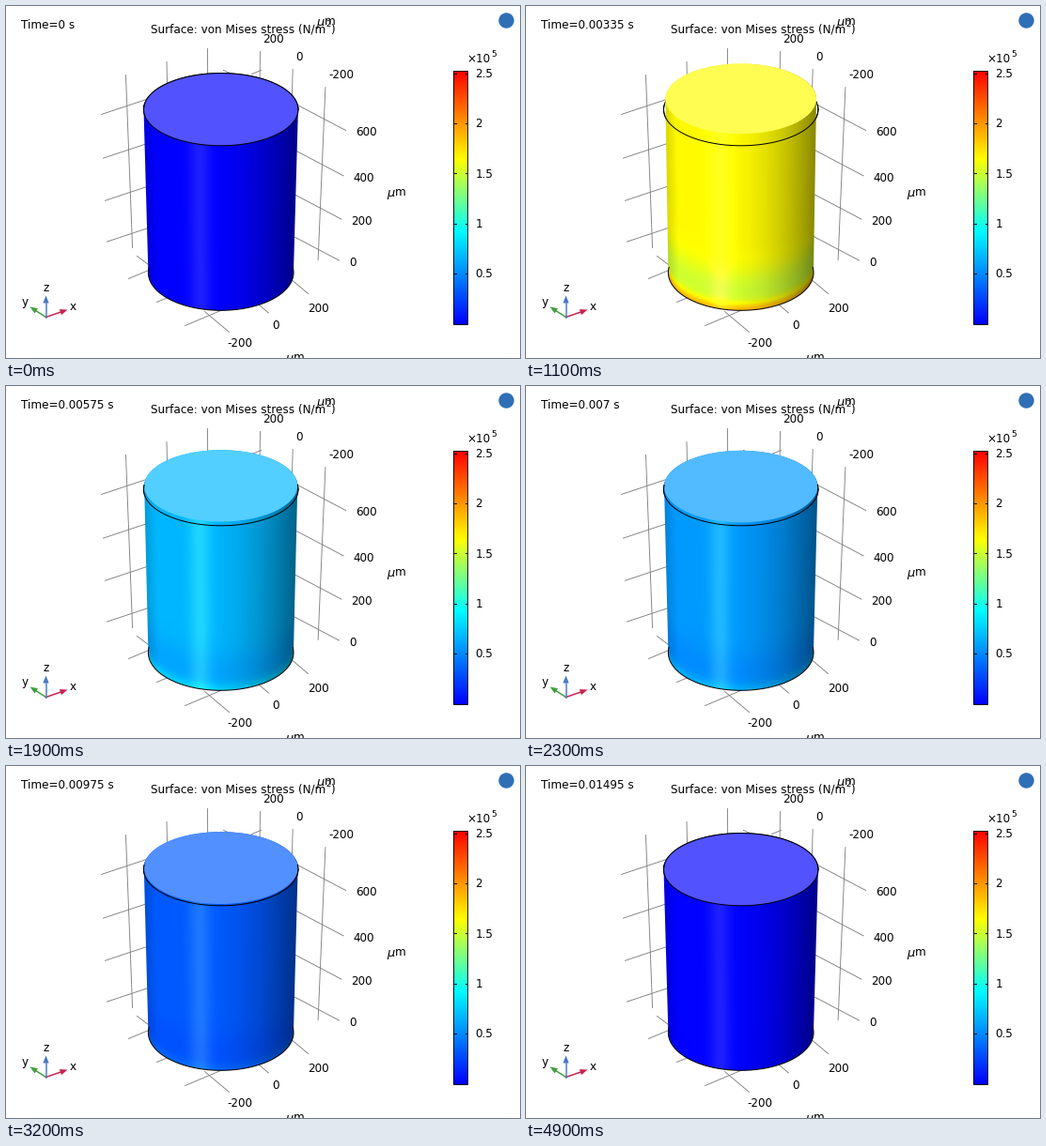
Animation of 547 by 375 pixels, one loop 5 s. Source, as a matplotlib script:

```python
import numpy as np
import matplotlib.pyplot as plt
from matplotlib.animation import FuncAnimation
from matplotlib.patches import Circle, Ellipse, Polygon, Rectangle
from matplotlib.path import Path

W, H, DPI = 547, 375, 64
PX = 72 / DPI                      # points per pixel
FRAMES, INTERVAL = 50, 100
MAX_STRESS = 2.53                  # in units of 1e5 N/m^2

CX, TOP_Y, BOTTOM_Y = 229.2, 110.7, 284.5
TOP_RX, TOP_RY = 82.2, 38.6
BOTTOM_RX, BOTTOM_RY = 77.3, 40.3
X0, X1, Y0, Y1 = 144, 315, 50, 330

plt.rcParams["font.family"] = "DejaVu Sans"
fig = plt.figure(figsize=(W / DPI, H / DPI), dpi=DPI, facecolor="white")
ax = fig.add_axes([0, 0, 1, 1])


def rainbow(frac):
    """Blue, cyan, yellow, red."""
    red = (frac - 0.37) / 0.28
    green = np.minimum(frac / 0.37, (1 - frac) / 0.35)
    blue = (0.65 - frac) / 0.28
    return np.clip(np.stack([red, green, blue], axis=-1), 0, 1)


def text(x, y, s, size=12, **kw):
    return ax.text(x, y, s, fontsize=size * PX, va="baseline", zorder=8, **kw)


def line(x, y, dx, dy, color="#808080", width=0.9, zorder=1):
    ax.plot([x, x + dx], [y, y + dy], color=color, lw=width * PX, zorder=zorder)


def micrometre(x, y):
    text(x, y, "μ", 13, style="italic")
    text(x + 8.5, y, "m")


def arc(cy, rx, ry, start, stop):
    a = np.radians(np.linspace(start, stop, 120))
    return CX + rx * np.cos(a), cy + ry * np.sin(a)


def arrow(dx, dy, color):
    origin, vector = np.array([43, 332]), np.array([dx, dy])
    d = vector / np.hypot(dx, dy)
    side = 3.2 * np.array([-d[1], d[0]])
    tip = origin + vector
    base = tip - 8 * d
    line(*origin, *(base - origin), color=color, width=1.5, zorder=5)
    ax.add_patch(Polygon([tip, base + side, base - side], fc=color, lw=0, zorder=6))


def draw_upright(x, y):
    line(x, y, 0.07 * (CX - x), 184)


def draw_grid():
    # Walls: uprights and heights, the spacing shrinking with depth.
    for k, name in enumerate(["200", "0", "-200"]):
        draw_upright(128 + 43.5 * k, 74 - 14 * k)
        x, y = 271 + 34.7 * k, 49 + 19 * k
        draw_upright(x, y)
        text(x + 3, y - 9.5, name)
    for k, name in enumerate(["600", "400", "200", "0"]):
        line(102 + 2 * k, 116 + 47.3 * k - 0.7 * k * k, 48, -16)
        x, y = 362 - 2.3 * k, 133 + 49.5 * k - 1.1 * k * k
        line(x, y, -55, -29)
        text(x + 10.5, y + 6, name)
    # Floor, seen between the cylinder and the labels.
    for k, name in enumerate(["200", "0", "-200"]):
        line(131 + 30 * k, 291 + 25 * k, 38, -16)
        line(322 - 42 * k, 307 + 20.5 * k, -26, -22)
        text(332.5 - 47.5 * k + 3 * k * k, 326 + 18.7 * k, name, ha="center")
    line(140, 267, 20, 15)
    # Far top corner.
    line(232, 69, 9, 4)
    line(262, 73, 10, -4)
    micrometre(331, 21)
    micrometre(406, 203)
    micrometre(298, 379)


def draw_colorbar():
    ramp = rainbow(np.linspace(1, 0, 270))[:, None]
    ax.imshow(ramp, extent=[476.5, 491.5, 339.5, 69.5], aspect="auto", zorder=2)
    ax.add_patch(Rectangle((476.5, 69.5), 15, 270, fill=False, lw=0.9 * PX, zorder=3))
    for value in np.arange(1, 6) / 2:
        y = 338.5 - value * 106.5
        for x in (477, 489):
            line(x, y, 2, 0, "black", zorder=4)
        text(500, y + 4.4, f"{value:g}")
    text(490.5, 61, "×10")
    text(517, 55, "5", 9)


def draw_triad():
    arrow(23, -8, "#cc2050")
    arrow(-17, -11, "#40a040")
    arrow(0, -23, "#4878c4")
    text(43, 305, "z", ha="center")
    text(21, 320, "y", ha="center")
    text(72, 325, "x", ha="center")


def bulk_stress(i):
    """Quick pull, then a slow release."""
    return np.interp(i, [0, 8, 11, 19, 32, 40, 50],
                     [0, 2.1, 1.66, 0.67, 0.33, 0.04, 0])


def time_label(i):
    t = int(i * 299 / 49 + 1e-6) * 5e-5
    if 0 < t < 9.99e-4:
        return f"Time={t * 1e4:.2g}E-4 s"
    return f"Time={t:.6g} s"


gx, gy = np.meshgrid(np.arange(X0, X1), np.arange(Y0, Y1))


def shaded_side(stress, top_y, top_rx, top_ry):
    """Colours of the curved wall, one per pixel."""
    span = BOTTOM_Y - top_y
    v = np.clip((gy - top_y) / span, 0, 1)
    u = np.clip((gx - CX) / (top_rx + (BOTTOM_RX - top_rx) * v), -1, 1)
    ry = top_ry + (BOTTOM_RY - top_ry) * v
    z = np.clip(1 - (gy - ry * np.sqrt(1 - u * u) - top_y) / span, 0, 1)
    local = stress * (1 - 0.09 * np.exp(-((z - 0.11) / 0.13) ** 2)
                      + 0.19 * np.exp(-(z / 0.04) ** 2))
    shade = (0.46 * np.clip((u + 0.2) / 1.2, 0, 1) ** 1.8
             + 0.14 * np.clip((-0.85 - u) / 0.15, 0, 1))
    gloss = 0.12 * np.exp(-((u + 0.28) / 0.14) ** 2)
    rgb = rainbow(local / MAX_STRESS) * (1 - shade[..., None])
    return np.clip(rgb + gloss[..., None], 0, 1)


draw_grid()
draw_colorbar()
draw_triad()
text(154.5, 29, "Surface: von Mises stress (N/m")
text(340.5, 22.5, "2", 8.5)
text(345.5, 29, ")")
ax.add_patch(Circle((533, 16), 8.2, fc="#2f6fb5", lw=0, zorder=5))

clock = text(17, 25, "")
wall = ax.imshow(np.ones((Y1 - Y0, X1 - X0, 3)), aspect="auto", zorder=3,
                 extent=[X0 - 0.5, X1 - 0.5, Y1 - 0.5, Y0 - 0.5],
                 interpolation="nearest")
lid = ax.add_patch(Ellipse((CX, TOP_Y), 2 * TOP_RX, 2 * TOP_RY, lw=0, zorder=4))
edge = dict(color="black", lw=1.0 * PX)
ax.plot(*arc(TOP_Y, TOP_RX, TOP_RY, 0, 360), zorder=2, **edge)
ax.plot(*arc(TOP_Y, TOP_RX, TOP_RY, -7, 187), zorder=5, **edge)
ax.plot(*arc(BOTTOM_Y, BOTTOM_RX, BOTTOM_RY, -8, 188), zorder=5, **edge)
back_rim, = ax.plot(*arc(TOP_Y, TOP_RX, TOP_RY, 180, 360), zorder=5, **edge)

# Pixel coordinates with y pointing down.
ax.set_xlim(0.5, W + 0.5)
ax.set_ylim(H + 0.5, 0.5)
ax.axis("off")


def update(i):
    stress = bulk_stress(i)
    stretch = (stress / 1.66) ** 1.2
    top_y = TOP_Y - 11.3 * stretch
    rx, ry = TOP_RX - 1.9 * stretch, TOP_RY - 1.2 * stretch

    wall.set_data(shaded_side(stress, top_y, rx, ry))
    upper = np.column_stack(arc(top_y, rx, ry, 180, 360))
    lower = np.column_stack(arc(BOTTOM_Y, BOTTOM_RX, BOTTOM_RY, 0, 180))
    wall.set_clip_path(Path(np.vstack([upper, lower])), transform=ax.transData)

    lid.set_center((CX, top_y))
    lid.width, lid.height = 2 * rx, 2 * ry
    lid.set_facecolor(0.32 + 0.68 * rainbow(stress / MAX_STRESS))
    back_rim.set_visible(bool(stretch < 0.06))
    clock.set_text(time_label(i))
    return wall, lid, back_rim, clock


anim = FuncAnimation(fig, update, frames=FRAMES, interval=INTERVAL,
                     repeat=True, repeat_delay=0, blit=False)
plt.show()
```
